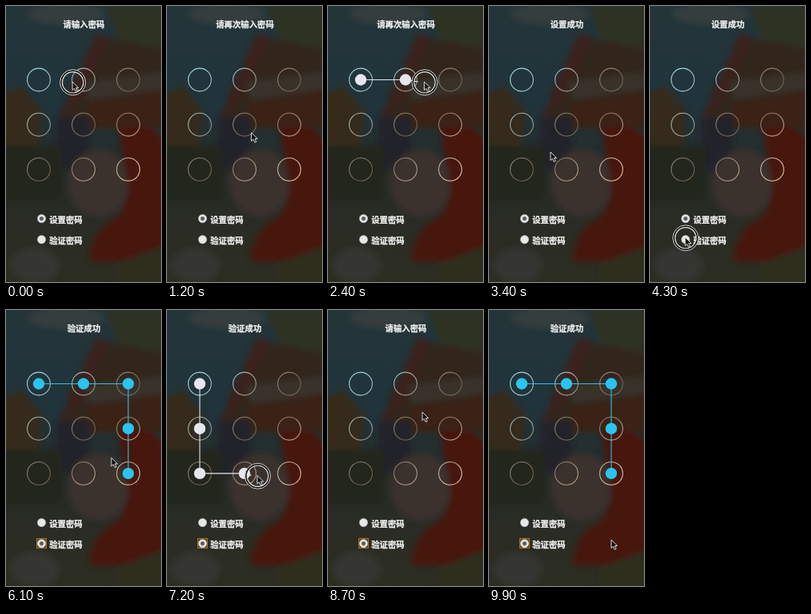
Recreate the animation shown at these times as an HTML page. Size 194 by 346 pixels, loop 10000 ms.

```html
<!DOCTYPE html>
<html lang="zh">
<head>
<meta charset="utf-8">
<title>手势密码</title>
<style>
html, body { margin: 0; width: 100%; height: 100%; overflow: hidden; background: #292b28; }
svg { display: block; width: 194px; height: 346px; }
text {
  font: bold 10.4px "Noto Sans CJK SC", "Noto Sans CJK", "Noto Sans", sans-serif;
  fill: #f0f0ee; stroke: #f0f0ee; stroke-width: .25px;
}
</style>
</head>
<body>
<svg viewBox="0 0 194 346">
  <defs>
    <linearGradient id="sky" x1="0" y1="0" x2="0" y2="1">
      <stop offset="0" stop-color="#243539"/>
      <stop offset=".35" stop-color="#20343c"/>
      <stop offset=".6" stop-color="#272b27"/>
      <stop offset="1" stop-color="#2d2e22"/>
    </linearGradient>
    <linearGradient id="rim" gradientUnits="userSpaceOnUse" x1="27" y1="78" x2="167" y2="219">
      <stop offset="0" stop-color="#a9dfeb"/>
      <stop offset=".3" stop-color="#a3a9a3"/>
      <stop offset=".55" stop-color="#75604f"/>
      <stop offset=".72" stop-color="#a99780"/>
      <stop offset="1" stop-color="#ead2aa"/>
    </linearGradient>
    <filter id="soft" x="-30%" y="-30%" width="160%" height="160%"><feGaussianBlur stdDeviation="3.5"/></filter>
  </defs>
  <rect width="194" height="346" fill="url(#sky)"/>
  <g filter="url(#soft)">
    <ellipse cx="75" cy="10" rx="48" ry="13" fill="#343c3d"/>
    <path d="M125 0 H200 V70 L140 40Z" fill="#2d3021"/>
    <path d="M-5 110 L20 100 L45 130 L40 190 H-5Z" fill="#35291f"/>
    <path d="M78 105 L120 38 L200 55 V155 H70Z" fill="#30251f"/>
    <path d="M62 150 L112 35 L130 40 L96 112Z" fill="#3a211a"/>
    <path d="M98 95 L200 82 V104 L104 118Z" fill="#38332c"/>
    <path d="M104 122 L200 106 V150 H104Z" fill="#3b2018"/>
    <path d="M64 140 H104 V205 H64Z" fill="#21242a"/>
    <path d="M-5 175 H70 V245 H-5Z" fill="#23271f"/>
    <ellipse cx="116" cy="222" rx="38" ry="42" fill="#3b322d"/>
    <path d="M140 152 Q185 145 200 170 V320 H105 Q104 290 130 270 Q160 255 150 205Z" fill="#46190f"/>
    <ellipse cx="36" cy="325" rx="30" ry="22" fill="#343532"/>
    <path d="M140 322 L200 300 V352 H140Z" fill="#2d2e1e"/>
  </g>

  <text id="title" x="97.5" y="26.5" text-anchor="middle"></text>
  <g id="rings" fill="none" stroke="url(#rim)" stroke-width="1.05"></g>
  <path id="line" fill="none" stroke-width="1.1"/>
  <g id="dots"></g>

  <rect id="focus" x="38.5" y="286.5" width="12" height="12" fill="#5a3d1b" stroke="#a8702c"/>
  <g fill="#e6e8e6" stroke="#a9adab" stroke-width=".5">
    <circle cx="44.5" cy="266.5" r="5.2"/>
    <circle cx="44.5" cy="292.7" r="5.2"/>
  </g>
  <circle id="pick" cx="44.5" r="2.6" fill="#50575a" stroke="#a5aaa8" stroke-width=".8"/>
  <text x="54.2" y="271.5">设置密码</text>
  <text x="54.2" y="298">验证密码</text>

  <g id="pointer">
    <g id="press" fill="none">
      <circle cx=".6" cy=".8" r="14.6" stroke="#111" stroke-width="3"/>
      <circle cx=".6" cy=".8" r="16" stroke="#d8d8d5"/>
      <circle cx=".6" cy=".8" r="13.2" stroke="#e6e6e3" stroke-width="1.2"/>
    </g>
    <path d="M0 0 V10.5 L2.5 8.3 L4.3 12.3 L6.2 11.4 L4.5 7.6 H7.7Z" fill="#111" stroke="#eee" stroke-width=".9"/>
  </g>
</svg>
<script>
const $ = id => document.getElementById(id);
const LOOP = 10000, STEP = 100, LEG = 150, HOLD = 100;
const WHITE = '#e6e6ee', BLUE = '#2bc3ef', RED = '#e8413a';

const spots = Array.from({ length: 9 }, (_, i) => ({ x: 41 + i % 3 * 56, y: 92.5 + Math.floor(i / 3) * 56.2 }));

// routes name the spots from 0 to 8
const strokes = [
  { down: -110, route: '01258', done: WHITE },
  { down: 2190, route: '01258', done: BLUE },
  { down: 5250, route: '01258', done: BLUE },
  { down: 6710, route: '03678', done: RED },
  { down: 8960, route: '01258', done: BLUE }
];
for (const s of strokes) {
  s.keys = [...s.route].map((n, i) => ({ t: s.down + i * LEG, spot: spots[n], x: spots[n].x + 1, y: spots[n].y + 2.5 }));
  s.up = s.keys.at(-1).t + HOLD;
  s.clear = s.up + 400;
}
const [first, second, third, wrong, last] = strokes;
last.clear = LOOP;

const click = { down: 4200, up: 4400 };
const at = (t, x, y) => ({ t, x, y });
const rest = s => ({ ...s.keys.at(-1), t: s.up });
const keys = [
  ...strokes.flatMap(s => [...s.keys, rest(s)]),
  at(2000, 42, 95), at(3400, 77, 183), at(click.down, 44, 290), at(click.up, 44, 290),
  at(5100, 43, 94), { ...rest(wrong), t: 8300 }, at(8700, 118, 128), at(9900, 153, 288), at(LOOP, 153, 288)
].sort((a, b) => a.t - b.t);

const titles = [
  [0, '请输入密码'], [first.up, '请再次输入密码'], [second.up, '设置成功'], [click.up, '请输入密码'],
  [third.up, '验证成功'], [wrong.up, '验证失败'], [wrong.clear, '请输入密码'], [last.up, '验证成功']
];

function place(t) {
  const i = Math.max(1, keys.findIndex(k => k.t >= t));
  const a = keys[i - 1], b = keys[i];
  const k = (t - a.t) / (b.t - a.t);
  return { x: a.x + (b.x - a.x) * k, y: a.y + (b.y - a.y) * k };
}

function addCircles(group, r) {
  return spots.map(({ x, y }) => {
    const c = document.createElementNS('http://www.w3.org/2000/svg', 'circle');
    c.setAttribute('cx', x);
    c.setAttribute('cy', y);
    c.setAttribute('r', r);
    return $(group).appendChild(c);
  });
}

addCircles('rings', 14.4);
const dots = addCircles('dots', 7.2);
const show = (el, on) => el.setAttribute('visibility', on ? 'visible' : 'hidden');
const held = (s, t) => t >= s.down && t < s.up;

function draw(t) {
  const tip = place(t);
  const stroke = strokes.find(s => t > Math.max(0, s.down) && t < s.clear);
  // a spot lights up as the pointer enters its ring
  const hits = stroke ? stroke.keys.filter(k => k.t - LEG / 4 <= t).map(k => k.spot) : [];
  const color = stroke && t >= stroke.up ? stroke.done : WHITE;
  const points = [...hits];
  if (stroke && t < stroke.up) points.push(place(t - 20));

  $('line').setAttribute('d', points.length ? 'M' + points.map(p => p.x + ' ' + p.y).join('L') : '');
  $('line').setAttribute('stroke', color);
  dots.forEach((c, i) => {
    show(c, hits.includes(spots[i]));
    c.setAttribute('fill', color);
  });

  const verify = t >= click.up;
  show($('focus'), verify);
  $('pick').setAttribute('cy', verify ? 292.7 : 266.5);
  $('title').textContent = titles.filter(m => m[0] <= t).pop()[1];
  show($('press'), [click, ...strokes].some(s => held(s, t)));
  $('pointer').setAttribute('transform', `translate(${tip.x} ${tip.y})`);
}

const start = performance.now();
function tick() {
  const t = (performance.now() - start) % LOOP;
  draw(Math.floor(t / STEP) * STEP);
  requestAnimationFrame(tick);
}
tick();
</script>
</body>
</html>
```
